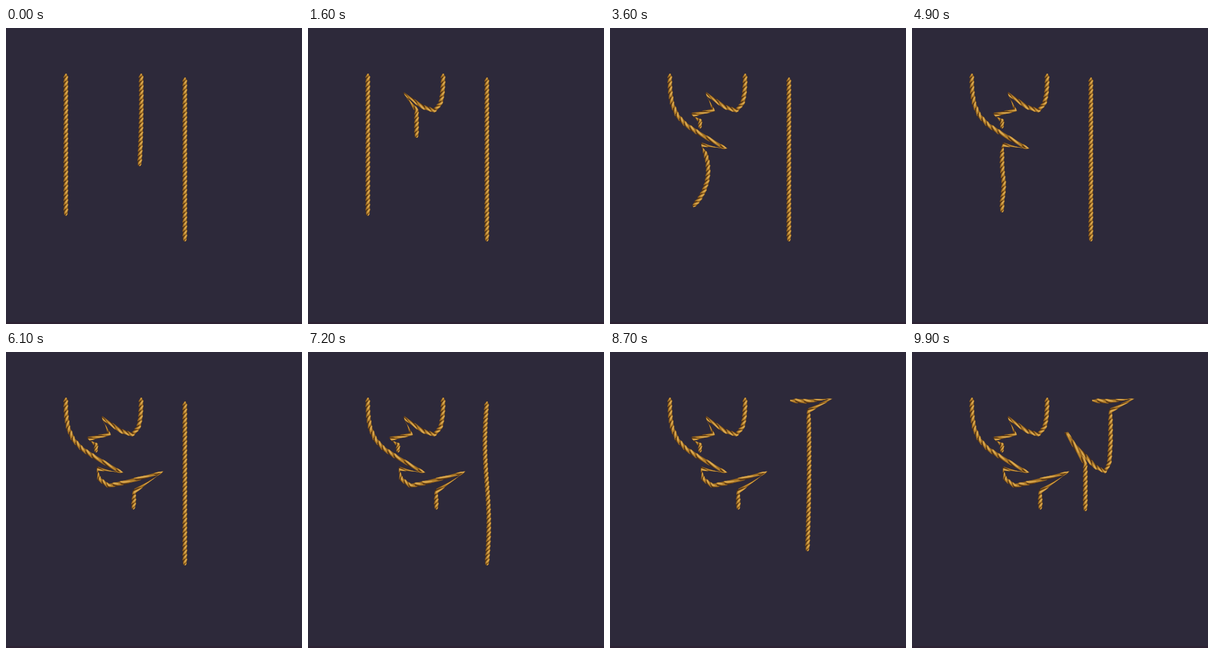
These frames come from a looping animation (480 by 480 pixels, 10000 ms). An HTML page with a canvas:

```html
<!DOCTYPE html>
<html lang="en">
<head>
<meta charset="utf-8">
<title>Ropes</title>
<style>
html, body { margin: 0; width: 100%; height: 100%; overflow: hidden; background: #2d293a; }
canvas { display: block; width: 480px; height: 480px; }
</style>
</head>
<body>
<canvas id="stage" width="480" height="480"></canvas>
<script>
const ctx = document.getElementById('stage').getContext('2d');
const LOOP = 10000, STEP = 100, HALF_WIDTH = 3.8;
const RAD = Math.PI / 180;

// Head joints as x,y pairs, then a tail whose angle from the vertical runs from a to b.
function pose(head, joints, length, a = 0, b = a) {
  const nodes = [];
  for (let i = 0; i < head.length; i += 2) nodes.push([head[i], head[i + 1]]);
  const first = nodes.length, span = Math.max(1, joints - first - 1);
  for (let i = first; i < joints; i++) {
    const [x, y] = nodes[i - 1];
    const angle = (a + (b - a) * (i - first) / span) * RAD;
    nodes.push([x + length * Math.sin(angle), y + length * Math.cos(angle)]);
  }
  return nodes;
}

function wavy(nodes, size) {
  return nodes.map(([x, y], i) =>
    [x - size * Math.sin(2 * Math.PI * i / (nodes.length - 1)), y]);
}

const left = (head, a, b) => pose(head, 16, 15.6, a, b);
const middle = (head, a, b) => pose(head, 11, 15, a, b);
const right = (head, a, b) => pose(head, 19, 15.2, a, b);

const leftStart = pose([97, 74], 16, 15.35);
const leftArc = [97, 74, 97, 90, 98, 107, 101, 124, 109, 142, 123, 157, 143, 170, 188, 196];
const leftHook = [...leftArc, 148, 189];
const leftBent = [...leftHook, 146, 204, 146, 220, 147, 236, 149, 252, 148, 268, 146, 283, 146, 299];
const leftLast = [...leftHook, 151, 206, 166, 217, 191, 212, 254, 195, 208, 226];

const middleStart = middle([219, 74], 1, -3);
const middleArc = [219, 74, 219, 90, 218, 106, 215, 122, 205, 134, 186, 128, 155.5, 106.5];
const middleHook = [...middleArc, 176, 133];
const middleLast = [...middleArc, 168, 133, 133, 141, 146, 150];

const rightStart = pose([290, 80.5], 19, 14.75);
const rightHook = [292, 79, 320, 80, 358, 76, 322, 95];
const rightRest = right(rightHook, 1, -2);
const rightLast = [...rightHook, 322, 112, 322, 129, 322, 146, 321, 163, 320, 180,
  313, 194, 297, 186, 279, 167, 250, 130, 281, 181];

const ropes = [
  [
    [2850, leftStart],
    [3300, left(leftHook, -4, -32)],
    [3600, left(leftHook, 25, -40)],
    [3900, left(leftHook, -12, 8)],
    [4200, left(leftHook, 4, 10)],
    [4500, left(leftHook, 0, -4)],
    [4800, left(leftHook, 0)],
    [4900, left(leftBent)],
    [5400, pose(leftLast, 16, 14.6, -14, -30)],
    [5700, pose(leftLast, 16, 14.6, 10, 22)],
    [6000, pose(leftLast, 16, 14.6, -3, -6)],
    [6300, pose(leftLast, 16, 14.6)]
  ],
  [
    [0, middleStart],
    [700, middle(middleHook, 8, 22)],
    [1000, middle(middleHook, -6, -12)],
    [1300, middle(middleHook, 2, 4)],
    [1600, middle(middleHook, 0)],
    [2100, pose(middleLast, 11, 12.5, 20)],
    [2300, pose(middleLast, 11, 12.5, -16)],
    [2500, pose(middleLast, 11, 12.5, 0)]
  ],
  [
    [6700, rightStart],
    [7200, wavy(rightStart, 3.2)],
    [7700, right(rightHook, -5, -13)],
    [8050, right(rightHook, 4, 7)],
    [8400, right(rightHook, -2, -3)],
    [8700, rightRest],
    [9400, rightRest],
    [9800, pose(rightLast, 19, 15.4, 4, 9)],
    [9900, pose(rightLast, 19, 15.4)]
  ]
];

function nodesAt(keys, t) {
  const next = keys.findIndex(key => key[0] > t);
  if (next === 0) return keys[0][1];
  if (next < 0) return keys[keys.length - 1][1];
  const [t0, from] = keys[next - 1], [t1, to] = keys[next];
  const p = (t - t0) / (t1 - t0), e = p * p * (3 - 2 * p);
  return from.map(([x, y], i) => [x + (to[i][0] - x) * e, y + (to[i][1] - y) * e]);
}

// Maps rope coordinates (s along the joints, v across) to the stage; both ends taper.
function ribbon(nodes) {
  const last = nodes.length - 1;
  const sides = nodes.map((_, i) => {
    const a = nodes[Math.max(0, i - 1)], b = nodes[Math.min(last, i + 1)];
    const dx = b[0] - a[0], dy = b[1] - a[1], d = Math.hypot(dx, dy) || 1;
    return [dy / d * HALF_WIDTH, -dx / d * HALF_WIDTH];
  });
  return (s, v) => {
    s = Math.min(last, Math.max(0, s));
    const i = Math.min(last - 1, Math.floor(s)), f = s - i;
    const w = v * Math.min(1, 0.4 + 2 * Math.min(s, last - s));
    return [0, 1].map(k =>
      nodes[i][k] * (1 - f) + nodes[i + 1][k] * f +
      w * (sides[i][k] * (1 - f) + sides[i + 1][k] * f));
  };
}

function fill(points, color) {
  ctx.beginPath();
  points.forEach(([x, y]) => ctx.lineTo(x, y));
  ctx.closePath();
  ctx.fillStyle = color;
  ctx.fill();
}

function strand(at, s, v0, v1, thick, color) {
  const upper = [], lower = [], steps = 6;
  for (let i = 0; i <= steps; i++) {
    const v = v0 + (v1 - v0) * i / steps;
    const mid = s - 0.28 * v;
    const h = thick * Math.sqrt(Math.max(0.06, 1 - (2 * i / steps - 1) ** 2));
    upper.push(at(mid - h, v));
    lower.unshift(at(mid + h, v));
  }
  fill([...upper, ...lower], color);
}

function drawRope(nodes) {
  const at = ribbon(nodes), last = nodes.length - 1;
  for (let s = 0; s < last; s += 0.25) {
    const band = (v0, v1, color) =>
      fill([at(s, v0), at(s + 0.27, v0), at(s + 0.27, v1), at(s, v1)], color);
    band(-0.8, 0, '#6b451a');
    band(0, 0.85, '#93641f');
  }
  for (let s = 0.1; s < last + 0.2; s += 0.5) {
    strand(at, s, -1, 1, 0.24, '#8f6020');
    strand(at, s, -0.6, 1, 0.18, '#b9852f');
    strand(at, s - 0.02, -0.2, 0.85, 0.11, '#d9a953');
    strand(at, s + 0.22, -1, 0.1, 0.08, '#4a2d14');
  }
}

function frame(now) {
  const t = Math.floor(now % LOOP / STEP) * STEP;
  ctx.fillStyle = '#2d293a';
  ctx.fillRect(0, 0, 480, 480);
  ctx.fillStyle = '#2d2233';
  ctx.fillRect(0, 477, 480, 3);
  ropes.forEach(keys => drawRope(nodesAt(keys, t)));
}

const start = performance.now();
function tick() {
  frame(performance.now() - start);
  requestAnimationFrame(tick);
}
tick();
</script>
</body>
</html>
```
